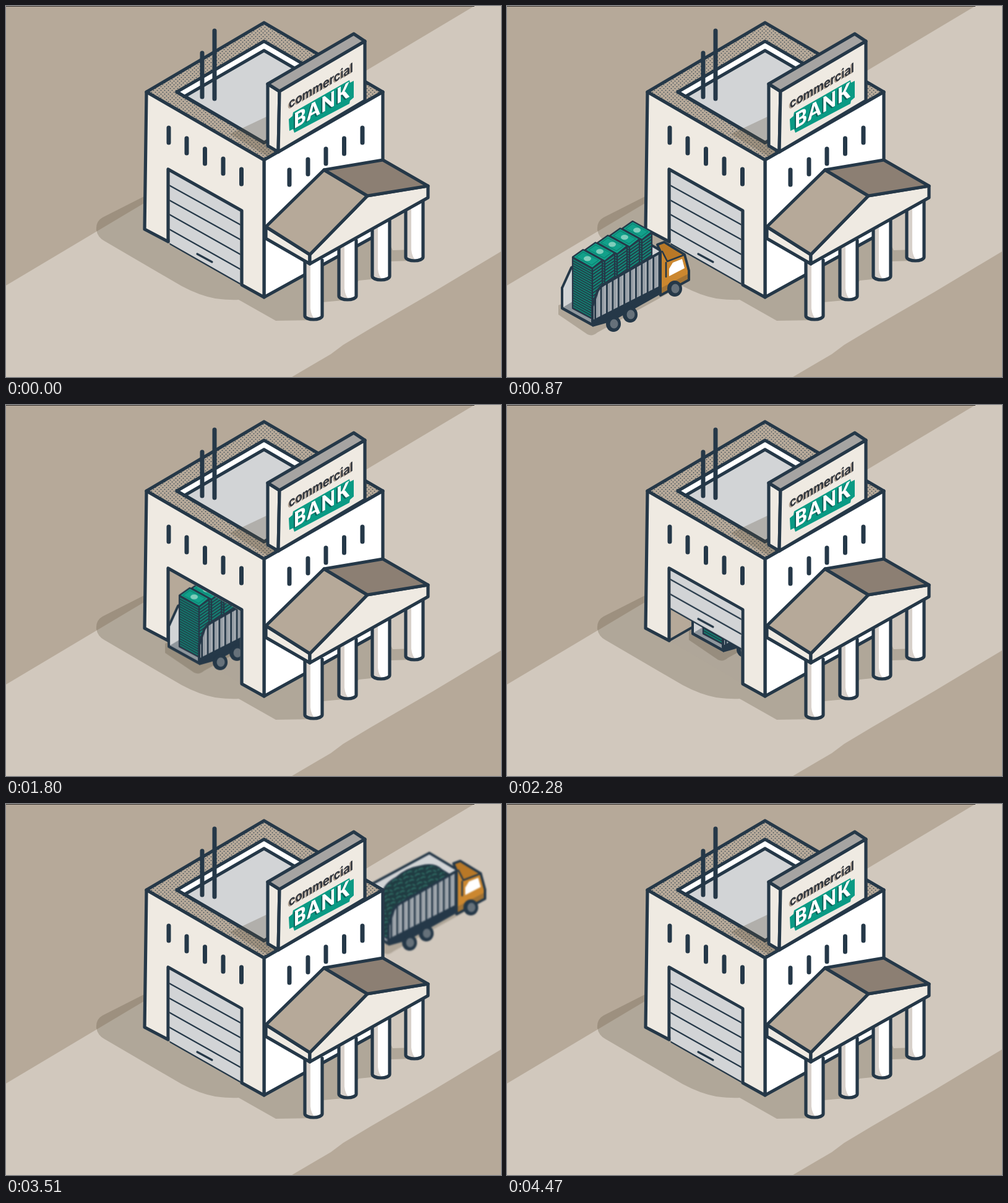
Write an HTML page without scripts that moves like this. It is 800x600 px and loops after 4500 ms.

```html
<!DOCTYPE html>
<html lang="en">
<head>
<meta charset="utf-8">
<title>Bank delivery</title>
<style>
  html, body { margin: 0; width: 100%; height: 100%; overflow: hidden; background: #b6a999; }
  svg { display: block; width: 800px; height: 600px; }
  .ink { stroke: #253848; stroke-width: 5.2; stroke-linejoin: round; stroke-linecap: round; }
  .mid { stroke-width: 4; }
  .thin { stroke-width: 2.2; }
  .bar { stroke-width: 7; }
  .line { fill: none; }
  .navy { fill: #253848; }
  .cream { fill: #efeae2; }
  .white { fill: #fff; }
  .gray { fill: #d2d4d6; }
  .tan { fill: #b6a999; }
  .road { fill: #d1c8bd; }
  .orange { fill: #cb872f; }
  .shade { fill: #5a503c; opacity: .28; }
  .small { font: 700 21px Inter, "Open Sans", sans-serif; }
  .big { font: 900 34px Lato, "Open Sans", sans-serif; letter-spacing: 2.3px; }

  .arrive, .leave, .open, .close, .blur { animation: 4.5s linear infinite; }
  .arrive { animation-name: arrive; }
  .leave { animation-name: leave; }
  .open { animation-name: open; }
  .close { animation-name: close; }
  .blur { animation-name: blur; }
  .moving { filter: blur(.8px); }

  @keyframes arrive {
    0% { transform: translate(-300px, 170px); animation-timing-function: ease-out; }
    18.4% { transform: none; }
    22.2% { transform: none; animation-timing-function: ease-in-out; }
    47.3%, 100% { transform: translate(211px, -119px); }
    0%, 62% { opacity: 1; }
    62.01%, 100% { opacity: 0; }
  }
  @keyframes leave {
    0%, 62.22% { transform: translate(287px, -179px); opacity: 0; }
    62.23% { transform: translate(287px, -179px); opacity: 1; }
    100% { transform: translate(749px, -444px); opacity: 1; }
  }
  @keyframes open {
    0%, 20% { transform: none; animation-timing-function: ease-in-out; }
    31%, 100% { transform: translateY(-124px); }
  }
  @keyframes close {
    0%, 39.3% { transform: translateY(-124px); animation-timing-function: ease-in-out; }
    60.7%, 100% { transform: none; }
  }
  @keyframes blur {
    0% { filter: blur(1.2px); }
    17%, 23.5% { filter: blur(0); }
    31%, 38% { filter: blur(.8px); }
    47%, 100% { filter: blur(0); }
  }
</style>
</head>
<body>
<svg viewBox="0 0 800 600" xmlns="http://www.w3.org/2000/svg">
  <defs>
    <pattern id="dots" width="6" height="6" patternUnits="userSpaceOnUse">
      <rect width="6" height="6" class="tan"/>
      <circle cx="1.5" cy="1.5" r=".8" class="navy"/>
      <circle cx="4.5" cy="4.5" r=".8" class="navy"/>
    </pattern>
    <pattern id="notesLeft" width="8" height="4" patternUnits="userSpaceOnUse" patternTransform="skewY(29)">
      <rect width="8" height="4" fill="#108270"/><rect width="8" height="1.9" class="navy"/>
    </pattern>
    <pattern id="notesRight" width="8" height="5" patternUnits="userSpaceOnUse" patternTransform="skewY(-35)">
      <rect width="8" height="5" fill="#128a77"/><rect width="8" height="2.4" class="navy"/>
    </pattern>
    <pattern id="ribs" x="160" width="9.4" height="8" patternUnits="userSpaceOnUse">
      <rect width="9.4" height="8" fill="#a9afb5"/><rect width="3" height="8" class="navy"/>
      <rect x="5" width="1" height="8" fill="#7b858e"/>
    </pattern>
    <pattern id="shreds" width="19" height="14" patternUnits="userSpaceOnUse" patternTransform="rotate(-14)">
      <rect width="19" height="14" fill="#203c42"/>
      <path d="M1 4q5-4 9-1M9 10q5-3 8 0M2 12l5-3M13 2l4 3" fill="none" stroke="#32756a" stroke-width="2"/>
    </pattern>

    <clipPath id="doorway"><path d="M264.500 268L378.500 332V453L264.500 386Z"/></clipPath>
    <clipPath id="outside"><path d="M0 0H262V267L378.500 333V600H0Z"/></clipPath>

    <g id="door">
      <path class="gray ink thin" d="M260 263L383 330V452L260 382Z"/>
      <path class="line ink thin" d="M262 289L381 355M262 313L381 379M262 336L381 403M262 360L381 427"/>
      <path class="line ink" style="stroke-width:3.2" d="M309 401L333 414"/>
    </g>

    <g id="stack">
      <path class="ink thin" fill="url(#notesLeft)" d="M106 406L138 424V506L106 489Z"/>
      <path class="ink thin" fill="url(#notesRight)" d="M138 424L154 411V494L138 506Z"/>
      <path class="ink thin" fill="#12a08a" d="M106 406L123 394L154 411L138 424Z"/>
      <path fill="none" stroke="#0b8371" stroke-width="1.2" d="M112 406L123 398L148 411L137 419Z"/>
      <ellipse cx="130" cy="408.500" rx="6" ry="4" fill="#7fcdbb"/>
    </g>

    <g id="wheel">
      <ellipse rx="12" ry="13" class="navy"/>
      <ellipse cx="1" rx="6.500" ry="7.500" fill="#66717a"/>
    </g>

    <g id="bed">
      <path class="shade" d="M83 484V499L130 531Q138 535 146 528L166 517L262 464L200 440Z"/>
      <path class="gray ink mid" d="M89 456L104 423L204 369L249 396L248 440L138 515L89 488Z"/>
      <path fill="#8f969c" d="M91 487L106 478L138 496V513Z"/>
      <path class="line ink mid" d="M89 456V489L138 516"/>
    </g>

    <g id="body">
      <path class="ink mid" fill="url(#ribs)" d="M138 511V486L146 462Q149 455 156 451L250 397V454Z"/>
      <path class="navy" d="M138 508L250 451V465L170 510L138 519Z"/>
      <path class="orange ink mid" d="M243 386L254 382L287 402L294 428V443L248 468V397Z"/>
      <path fill="#b87827" d="M246 387L254 384L283 403L259 413Z"/>
      <path class="line ink" style="stroke-width:2.6" d="M251 397L259 413L285 403M257 415V438"/>
      <path class="white" d="M262 437V425L268 415L283 409L287 424Z"/>
      <path class="navy" d="M249 456L293 433V444L249 469Z" opacity=".25"/>
      <use href="#wheel" x="271" y="457"/>
      <use href="#wheel" x="172" y="514"/>
      <use href="#wheel" x="199" y="499"/>
    </g>

    <g id="column">
      <path class="white" d="M0 -90V0A14 6 0 0 0 28 0V-90Z"/>
      <path fill="#d8d1cb" d="M0 -90H9V-12Q10 0 17 6Q4 6 0 0Z"/>
      <path class="line ink" d="M0 -90V0A14 6 0 0 0 28 0V-90"/>
    </g>
  </defs>

  <!-- ground -->
  <rect width="800" height="600" class="tan"/>
  <path class="road" d="M0 452L757 0H800V397L690 463L590 521L545 548L525 563L462 600H0Z"/>
  <path class="shade" d="M225 307L156 342Q145 348 146 362Q148 374 159 380L284 453Q312 468 338 473Q362 476 376 475L436 509L500 508L512 479L545 476L570 444L600 441L620 413L655 412V394L625 395L610 365L500 330L228 250Z"/>
  <path d="M0 .5H757" stroke="#34302d"/>

  <!-- truck with shredded cash, behind the bank -->
  <g class="leave"><g class="moving">
    <use href="#bed"/>
    <path class="ink thin" fill="url(#shreds)" d="M122 500L127 436Q132 418 150 409Q166 394 190 390Q212 384 224 396L240 406L150 480L138 508Z"/>
    <use href="#body"/>
  </g></g>

  <!-- roof -->
  <path class="ink" fill="url(#dots)" d="M227 139L417 27L609 139L417 249Z"/>
  <path class="white ink" d="M276 139L417 57L558 139L417 221Z"/>
  <path class="gray ink" d="M289 146L417 72L546 147L417 221Z"/>
  <path class="line ink" d="M276 139L417 221"/>
  <path class="shade" d="M362 207L421 179V224L440 236L424 244Z"/>
  <path class="line ink bar" d="M317 76V147M337 40V150"/>

  <!-- walls -->
  <path class="white ink" d="M417 249L609 139V365L417 471Z"/>
  <path fill="#afa699" d="M262 264L381 331V451L262 381Z"/>
  <path class="tan" d="M262 264L365 322L262 381Z"/>
  <path class="line ink mid" d="M262 381L365 322"/>
  <path class="cream" d="M227 139L417 249V471L381 451V331L262 264V381L224 361Z"/>
  <g clip-path="url(#doorway)"><use href="#door" class="open"/></g>
  <path class="line ink" d="M262 381L224 361L227 139L417 249V471L381 451V331L262 264V381"/>
  <path class="line ink bar" d="M263 197V221M292 214V238M321.500 231V255M351 247V271M380.500 264V288
    M458 265V289M488 248V272M517 231V255M546.500 214V239M576 197V221"/>

  <!-- sign -->
  <g class="ink">
    <path class="cream" d="M423 126L442 138L440 236L423 226Z"/>
    <path fill="#a6a4a2" d="M423 126L562 45L580 57L442 138Z"/>
    <path class="cream" d="M442 138L580 57V153L440 236Z"/>
  </g>
  <path fill="#0a9a84" d="M457 183L463 178L464 172L555 120L556 124L562 121V148L556 153L555 158L466 205L464 199L458 202Z"/>
  <g class="small">
    <text transform="matrix(.866 -.5 0 1 455 168)" fill="#b0a293">commercial</text>
    <text transform="matrix(.866 -.5 0 1 457 166)" fill="#30353d">commercial</text>
  </g>
  <g class="big">
    <text transform="matrix(.866 -.5 0 1 463 201)" fill="#0b5f57">BANK</text>
    <text transform="matrix(.866 -.5 0 1 465 199)" class="white">BANK</text>
  </g>

  <!-- portico -->
  <use href="#column" x="646" y="406"/>
  <use href="#column" x="592" y="437"/>
  <use href="#column" x="538" y="469"/>
  <use href="#column" x="483" y="501"/>
  <g class="ink">
    <path class="cream" d="M420 357L491 402V417L420 376Z"/>
    <path class="cream" d="M491 402L584 307L682 291V310L491 417Z"/>
    <path class="tan" d="M420 357L514 265L584 307L491 402Z"/>
    <path fill="#8c7f73" d="M514 265L609 249L682 291L584 307Z"/>
  </g>

  <!-- truck with stacked cash, driving in -->
  <g clip-path="url(#outside)"><g class="arrive"><g class="blur">
    <use href="#bed"/>
    <use href="#stack" x="80" y="-46"/>
    <use href="#stack" x="60" y="-34.500"/>
    <use href="#stack" x="40" y="-23"/>
    <use href="#stack" x="20" y="-11.500"/>
    <use href="#stack"/>
    <use href="#body"/>
  </g></g></g>
  <g clip-path="url(#doorway)"><use href="#door" class="close"/></g>
</svg>
</body>
</html>
```
